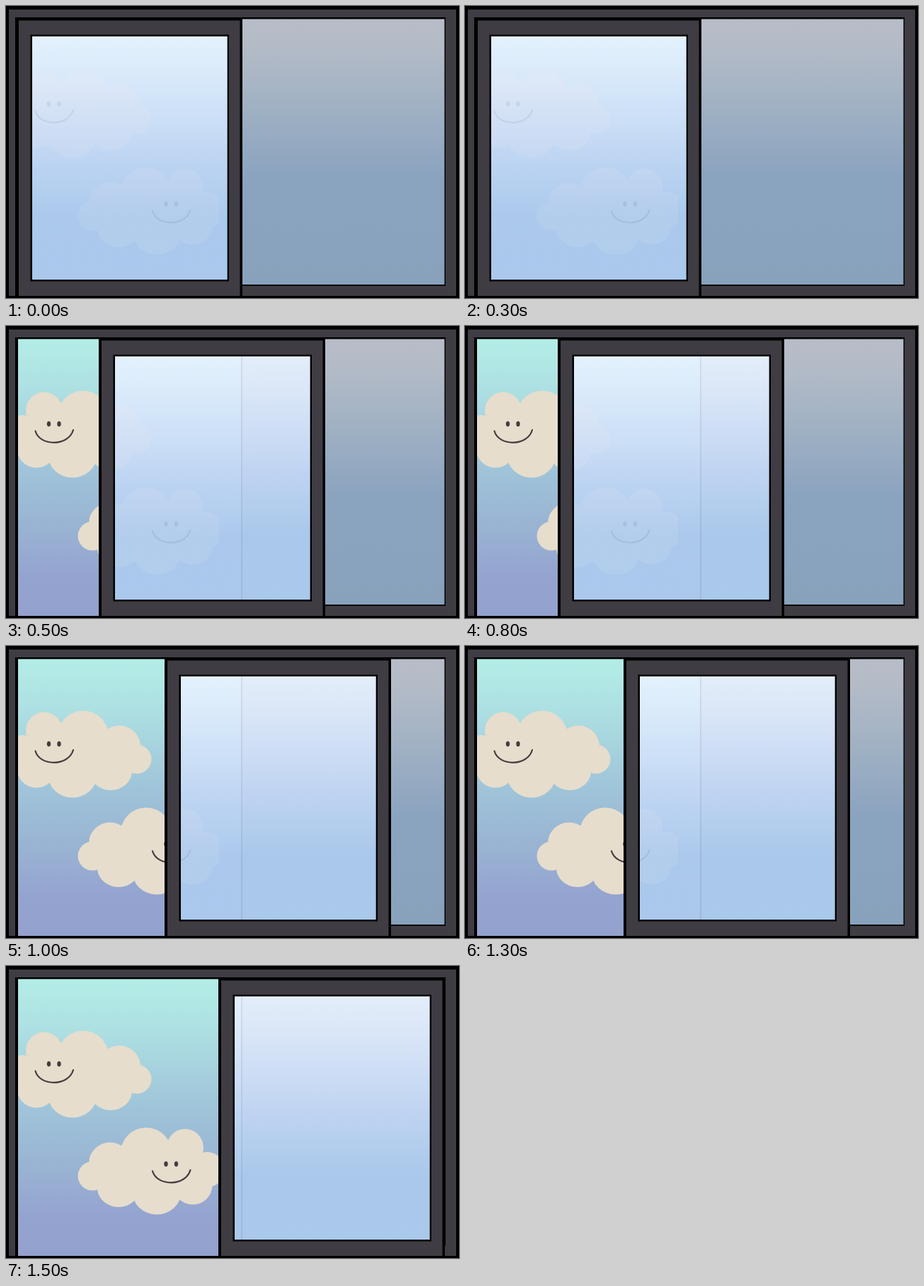
An HTML page that plays this animation: 640x413 px, repeating every 2 s.

```html
<!DOCTYPE html>
<html lang="en">
<head>
<meta charset="utf-8">
<title>Sliding window</title>
<style>
  html, body { margin: 0; width: 100%; height: 100%; overflow: hidden; background: #000; }
  svg { display: block; width: 100%; height: 100%; }
  .frame { fill: #3f3d43; }
  .cloud { fill: #e6ddcd; }
  .face { fill: #453c3f; }
  .smile { fill: none; stroke: #453c3f; stroke-width: 2.2; stroke-linecap: round; }
  .sash { animation: slide 2s step-end infinite; }
  @keyframes slide {
    0% { transform: translateX(0); }
    25% { transform: translateX(117px); }
    50% { transform: translateX(210px); }
    75% { transform: translateX(286px); }
  }
</style>
</head>
<body>
<svg viewBox="0 0 640 413" preserveAspectRatio="none">
  <defs>
    <linearGradient id="sky" gradientUnits="userSpaceOnUse" x1="0" y1="18" x2="0" y2="410">
      <stop offset="0" stop-color="#b3ede7"/>
      <stop offset=".17" stop-color="#aee1e3"/>
      <stop offset=".47" stop-color="#9fc4d9"/>
      <stop offset=".72" stop-color="#98b0d2"/>
      <stop offset=".86" stop-color="#94a3d0"/>
      <stop offset="1" stop-color="#93a1ce"/>
    </linearGradient>
    <linearGradient id="pane" gradientUnits="userSpaceOnUse" x1="0" y1="18" x2="0" y2="394">
      <stop offset="0" stop-color="#b7bcc8"/>
      <stop offset=".1" stop-color="#b4bbc7"/>
      <stop offset=".33" stop-color="#a0b1c3"/>
      <stop offset=".6" stop-color="#8aa3bf"/>
      <stop offset="1" stop-color="#89a2bc"/>
    </linearGradient>
    <linearGradient id="glass" gradientUnits="userSpaceOnUse" x1="0" y1="43" x2="0" y2="387">
      <stop offset="0" stop-color="#e8f2ff"/>
      <stop offset=".22" stop-color="#d9e7fb"/>
      <stop offset=".46" stop-color="#c5d9f6"/>
      <stop offset=".74" stop-color="#adcbef"/>
      <stop offset="1" stop-color="#adccef"/>
    </linearGradient>
    <clipPath id="view"><path d="M17 18H301V410H17Z"/></clipPath>
    <g id="cloud" class="cloud">
      <circle cx="122" cy="297" r="20.5"/>
      <ellipse cx="147" cy="279" rx="30" ry="29.5"/>
      <ellipse cx="198" cy="264" rx="36" ry="35.5"/>
      <ellipse cx="253" cy="257" rx="26" ry="26.5"/>
      <circle cx="284" cy="288" r="25"/>
      <ellipse cx="159" cy="314" rx="30" ry="27"/>
      <ellipse cx="213" cy="318" rx="35" ry="33.5"/>
      <ellipse cx="264" cy="310" rx="27.5" ry="27.5"/>
      <path d="M130 270H280V322H130Z"/>
    </g>
    <g id="face">
      <ellipse class="face" cx="226" cy="280" rx="2.7" ry="3.7"/>
      <ellipse class="face" cx="240.5" cy="280" rx="2.7" ry="3.7"/>
      <path class="smile" d="M207 290C213 312 254 312 260.500 288.500"/>
    </g>
  </defs>

  <path class="frame" d="M4 5H636V410H4Z"/>
  <path d="M13 16H334V413H13Z"/>
  <path fill="url(#sky)" d="M17 18.500H332V410H17Z"/>
  <g clip-path="url(#view)">
    <use href="#cloud" transform="matrix(-1 0 0 1 307 -137)"/>
    <use href="#cloud"/>
    <use href="#face" x="-165.500" y="-141.500"/>
    <use href="#face"/>
  </g>
  <path d="M332 16H621V396H332Z"/>
  <path fill="url(#pane)" d="M334 18.500H619.500V394H334Z"/>

  <g class="sash">
    <path fill-rule="evenodd" d="M14 17H334V413H14ZM37 43V387H312.500V43Z"/>
    <path class="frame" fill-rule="evenodd" d="M18 20.500H330.500V410H18ZM34.500 40.500V389.500H315V40.500Z"/>
    <path fill="url(#glass)" opacity=".91" d="M37 43H312.500V387H37Z"/>
  </g>
</svg>
</body>
</html>
```
